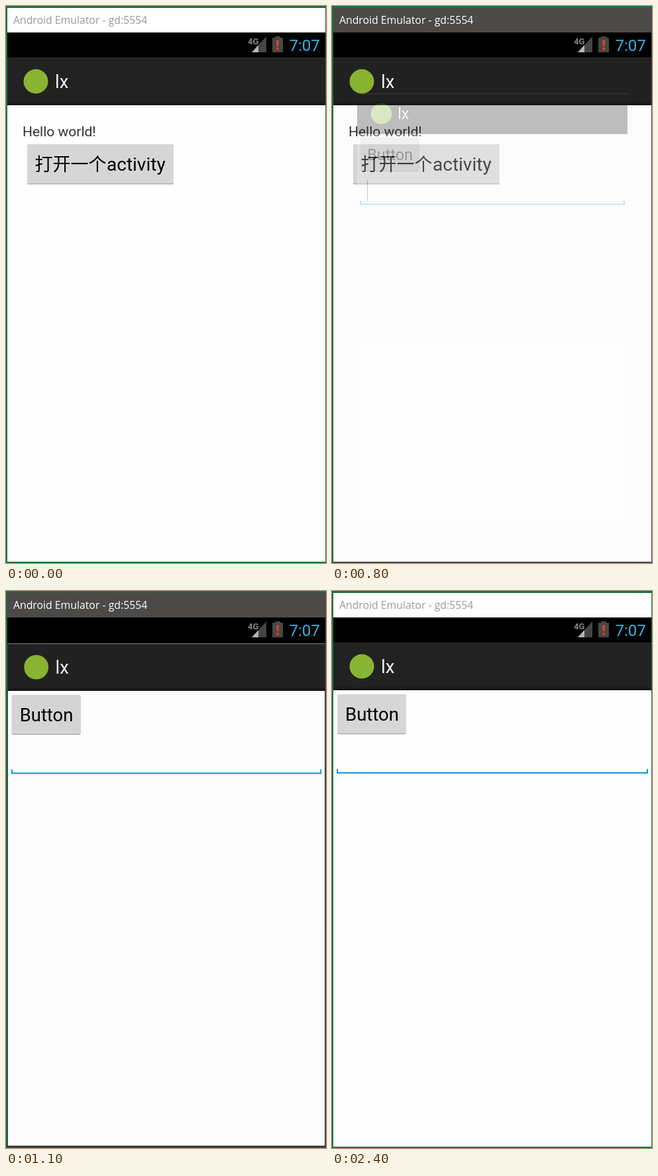
Animation, 483 px wide and 842 px high, one loop 2500 ms. Source, as an HTML page:

```html
<!DOCTYPE html>
<html lang="en">
<head>
<meta charset="utf-8">
<title>Opening an activity</title>
<style>
  html, body { margin: 0; width: 100%; height: 100%; overflow: hidden; }
  svg { display: block; width: 483px; height: 842px; }
  text { font-family: Roboto, sans-serif; white-space: pre; }
  .title { font: 15.8px "Open Sans", sans-serif; }
  .large { font-size: 27.5px; }
  .han { font: 27px "Noto Sans CJK SC", "Noto Sans CJK JP", "Noto Sans CJK", sans-serif; }
  .face { fill: #d6d6d6; }
  .halo { fill: #33b5e5; opacity: 0; }
  .pressed .face { fill: #7cc7e3; }
  .pressed .halo { opacity: .3; }
</style>
</head>
<body>
<svg viewBox="0 0 483 842">
  <defs>
    <linearGradient id="shade" x2="0" y2="1">
      <stop offset="0" stop-color="#222"/>
      <stop offset=".92" stop-color="#222"/>
      <stop offset="1" stop-color="#101010"/>
    </linearGradient>
    <g id="page">
      <rect x="2" y="78" width="480" height="762" fill="#fefefe"/>
      <rect x="2" y="78" width="480" height="72" fill="url(#shade)"/>
      <circle cx="45" cy="114" r="18.5" fill="#8ab532"/>
      <text class="large" x="74" y="124" fill="#f3f3f3">lx</text>
    </g>
  </defs>

  <rect id="frame" width="483" height="842"/>
  <rect width="483" height="2" fill="#1b7342"/>
  <rect width="1" height="842" fill="#1b7342"/>
  <rect id="leftEdge" x="1" y="2" width="1" height="839"/>
  <rect id="titleBar" x="2" y="3" width="480" height="37"/>
  <text id="title" class="title" x="11" y="27">Android Emulator - gd:5554</text>
  <rect x="2" y="40" width="480" height="800"/>

  <g id="firstPage">
    <use href="#page"/>
    <rect x="2" y="78" width="480" height="1" fill="#303030"/>
    <text x="25" y="197" font-size="21" fill="#333">Hello world!</text>
    <g id="openButton">
      <rect class="halo" x="26" y="203" width="233" height="72" rx="5"/>
      <rect x="32" y="210" width="221" height="59.5" rx="2" fill="#979797"/>
      <rect class="face" x="32" y="209" width="221" height="59.5" rx="2"/>
      <text class="han" x="43.5" y="249">打开一个</text>
      <text x="152" y="249" font-size="28">activity</text>
    </g>
  </g>

  <g id="secondPage">
    <use href="#page"/>
    <rect id="topEdge" x="2" y="78" width="480" height="1"/>
    <rect x="8" y="157" width="104" height="59.5" rx="2" fill="#979797"/>
    <rect class="face" x="8" y="156" width="104" height="59.5" rx="2"/>
    <text class="large" x="20" y="196">Button</text>
    <path d="M8 269V275H476V269" fill="none" stroke="#0f9bcb" stroke-width="2"/>
    <rect id="cursor" x="20" y="232" width="1" height="37"/>
  </g>

  <text x="365" y="57.5" font-size="13" font-weight="700" fill="#868686">4G</text>
  <path d="M371 70L393 46V70Z" fill="#454545"/>
  <path d="M371 70L381 59V70Z" fill="#b5b5b5"/>
  <path d="M402 48H406V46H414V48H418V70H402Z" fill="#474747"/>
  <path d="M408 52H412L411.3 61H408.7ZM408.3 63H411.7V66.5H408.3Z" fill="#e2441c"/>
  <text x="427.5" y="68" font-size="24" fill="#33b5e5">7:07</text>
</svg>
<script>
const LOOP = 2500, OPEN_START = 800, OPEN_END = 1200, TICK = 100;
const part = id => document.getElementById(id);
const paint = (id, color) => part(id).setAttribute('fill', color);
const show = (id, visible) => part(id).setAttribute('visibility', visible ? 'inherit' : 'hidden');
const between = (t, start, end) => t >= start && t < end;

function drawWindow(active) {
  paint('frame', active ? '#4c4a48' : '#1b7342');
  paint('leftEdge', active ? '#17693a' : '#1b7342');
  paint('titleBar', active ? '#4c4a48' : '#fff');
  paint('title', active ? '#fff' : '#999');
}

// The new page grows and fades in while the old one fades to black.
function drawPages(t) {
  const opened = t >= OPEN_END;
  const step = Math.floor((t - OPEN_START) / TICK);
  const remaining = opened ? 0 : (0.944 - 0.1675 * step) ** 5;
  const scale = 1 - 0.2 * remaining;

  show('firstPage', !opened);
  show('secondPage', t >= OPEN_START);
  if (t < OPEN_START) {
    part('firstPage').setAttribute('opacity', 1);
    return;
  }
  part('firstPage').setAttribute('opacity', (1 + Math.cos(Math.PI * (0.05 + 0.257 * step))) / 2);
  part('secondPage').setAttribute('opacity', 1 - remaining ** 1.15);
  part('secondPage').setAttribute('transform',
    `translate(242 440) scale(${scale}) translate(-242 -440)`);
  paint('topEdge', opened ? '#303030' : '#777');
}

function draw(now) {
  const t = now % LOOP;
  drawWindow(between(t, 100, 2400));
  drawPages(t);
  part('openButton').classList.toggle('pressed', between(t, 100, 400));
  show('cursor', between(t, 800, 1100) || between(t, 1500, 2000));
}

const start = performance.now();
function frame() {
  draw(performance.now() - start);
  requestAnimationFrame(frame);
}
frame();
</script>
</body>
</html>
```
